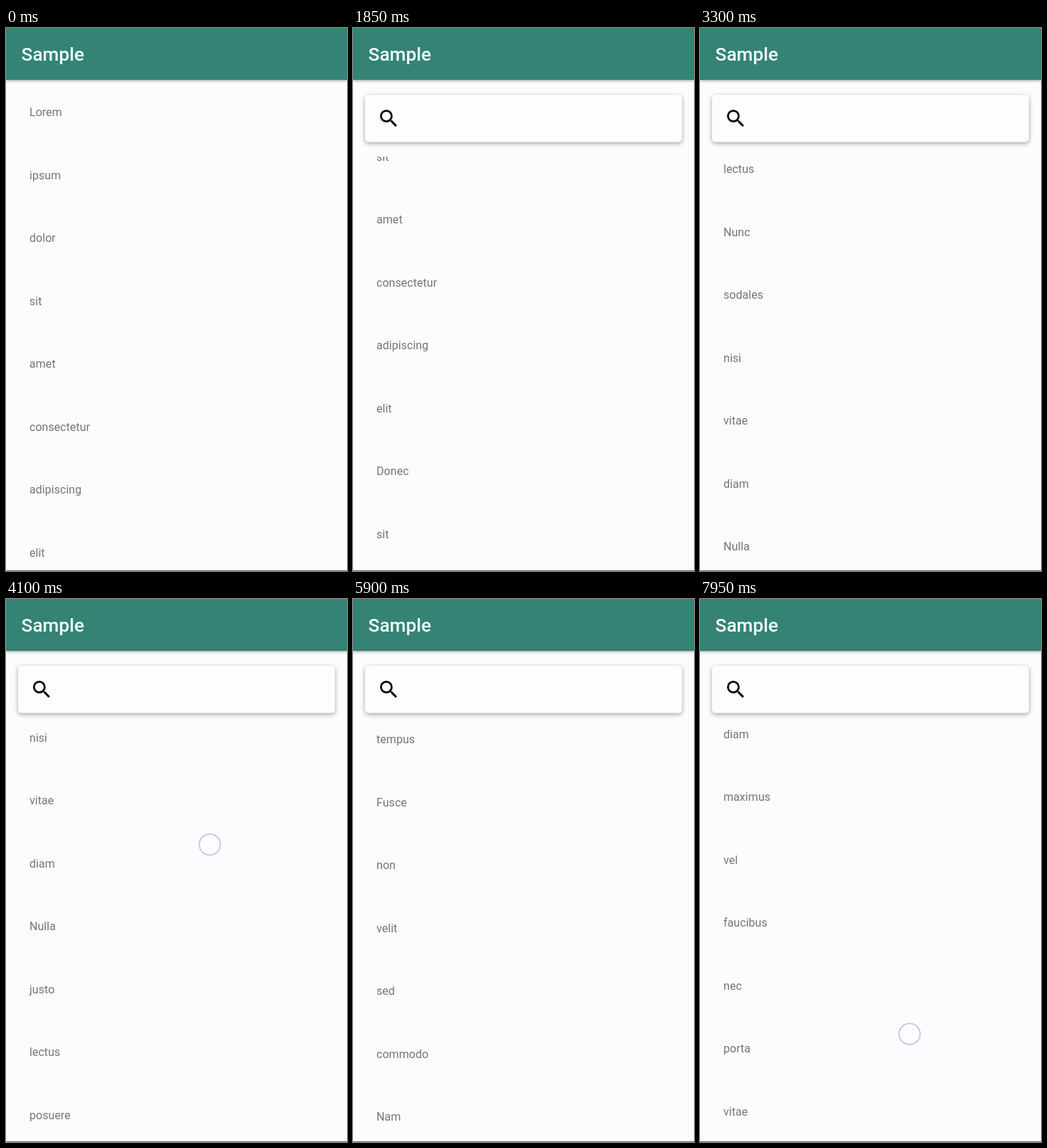
Write an HTML page that moves like this. It is 480 px wide and 764 px high and loops after 8 s.

```html
<!DOCTYPE html>
<html lang="en">
<head>
<meta charset="utf-8">
<title>Sample</title>
<style>
  html, body { margin: 0; width: 100%; height: 100%; overflow: hidden; background: #fefbff; }
  svg { display: block; width: 100%; height: 100%; }
  text { font-family: Roboto, sans-serif; }
  #list text { font-size: 16.1px; fill: #757577; }
  #card { filter: drop-shadow(0 2px 3px rgba(0, 0, 0, .36)); }
  #header { filter: drop-shadow(0 1px 2px rgba(0, 0, 0, .4)); }
</style>
</head>
<body>
<svg viewBox="0 0 480 764">
  <defs>
    <clipPath id="viewport"><rect y="181" width="480" height="800"/></clipPath>
  </defs>
  <rect width="480" height="764" fill="#fefbff"/>
  <g id="content">
    <g clip-path="url(#viewport)">
      <g id="list"></g>
      <path id="glow" fill="#009682"/>
    </g>
    <rect id="card" x="17" y="94" width="446" height="66.5" rx="5" fill="#fefcff"/>
    <path transform="translate(33.9 110.9) scale(1.37)" d="M15.5 14h-.79l-.28-.27A6.47 6.47 0 0 0 16 9.5 6.5 6.5 0 1 0 9.5 16c1.61 0 3.09-.59 4.23-1.57l.27.28v.79l5 4.99L20.49 19zm-6 0a4.5 4.5 0 1 1 0-9 4.5 4.5 0 0 1 0 9z"/>
  </g>
  <rect id="header" y="-10" width="480" height="83" fill="#348374"/>
  <text x="21.5" y="46" font-size="26.3" font-weight="500" fill="#f4fffc">Sample</text>
  <rect y="763" width="480" height="1" fill="#68686c"/>
  <circle id="touch" r="14.8" fill="#fff" fill-opacity=".3" stroke="#c9cbe2" stroke-width="2"/>
</svg>
<script>
const DURATION = 8000, ROW = 88.5, BAR = 108;
const words = `Lorem ipsum dolor sit amet consectetur adipiscing elit Donec sit amet
  molestie lectus Nunc sodales nisi vitae diam Nulla justo lectus posuere blandit
  sagittis Nam scelerisque et neque in tempus Fusce non velit sed commodo Nam quam
  diam maximus vel faucibus nec porta vitae`.split(/\s+/);

// Finger path from one point to another; the list follows, then coasts to rest.
const pull = { start: 150, end: 850, from: [255, 300], to: [275, 560] };
const swipes = [
  { start: 1400, end: 1650, from: [305, 560], to: [290, 320], scroll: [0, 240], rest: 340, stop: 2150 },
  { start: 2250, end: 2530, from: [315, 612], to: [297, 255], scroll: [340, 672], rest: 1092, stop: 3400 },
  { start: 3900, end: 4170, from: [301, 612], to: [282, 254], scroll: [1092, 1450], rest: 1996, stop: 5050 },
  { start: 5300, end: 5580, from: [309, 612], to: [290, 260], scroll: [1996, 2348], rest: 2718, stop: 6450 },
  { start: 6680, end: 6990, from: [270, 612], to: [261, 271], scroll: [2718, 3059], rest: 3311, stop: 7640 },
  { start: 7880, end: 8600, from: [295, 612], to: [295, 612], scroll: [3311, 3311], rest: 3311, stop: 8700 }
];

const $ = id => document.getElementById(id);
const clamp = v => Math.min(1, Math.max(0, v));
const progress = (t, a, b) => clamp((t - a) / (b - a));
const mix = (a, b, u) => a + (b - a) * u;

words.forEach((word, i) => {
  const label = document.createElementNS("http://www.w3.org/2000/svg", "text");
  label.setAttribute("x", 33);
  label.setAttribute("y", 232 + i * ROW);
  label.textContent = word;
  $("list").append(label);
});

function scrollAt(t) {
  const s = swipes.findLast(s => t >= s.start);
  if (!s) return 0;
  if (t < s.end) return mix(...s.scroll, progress(t, s.start, s.end));
  return mix(s.rest, s.scroll[1], (1 - progress(t, s.end, s.stop)) ** 2.4);
}

function drawTouch(t) {
  const g = [pull, ...swipes].findLast(g => t >= g.start);
  const u = g ? progress(t, g.start, g.end) : 0;
  const alpha = g ? progress(t, g.start, g.start + 50) * (1 - progress(t, g.end, g.end + 100)) : 0;
  $("touch").setAttribute("opacity", alpha);
  if (!g) return;
  $("touch").setAttribute("cx", mix(g.from[0], g.to[0], u));
  $("touch").setAttribute("cy", mix(g.from[1], g.to[1], u));
}

function drawGlow(t, overscroll) {
  const strength = clamp(overscroll / 150) * (1 - progress(t, pull.end, 1450));
  const depth = 46 * strength;
  $("glow").setAttribute("opacity", .2 * strength);
  $("glow").setAttribute("d",
    `M0 181V${181 + depth * .48}Q265 ${181 + depth * 1.43} 480 ${181 + depth * .65}V181z`);
}

function draw(t) {
  const pulled = mix(0, pull.to[1] - pull.from[1], progress(t, pull.start, pull.end));
  const reveal = Math.min(BAR, pulled);
  $("content").setAttribute("transform", `translate(0 ${reveal - BAR})`);
  $("list").setAttribute("transform", `translate(0 ${-scrollAt(t)})`);
  drawGlow(t, pulled - BAR);
  drawTouch(t);
}

const began = performance.now();
function tick() {
  draw((performance.now() - began) % DURATION);
  requestAnimationFrame(tick);
}
tick();
</script>
</body>
</html>
```
